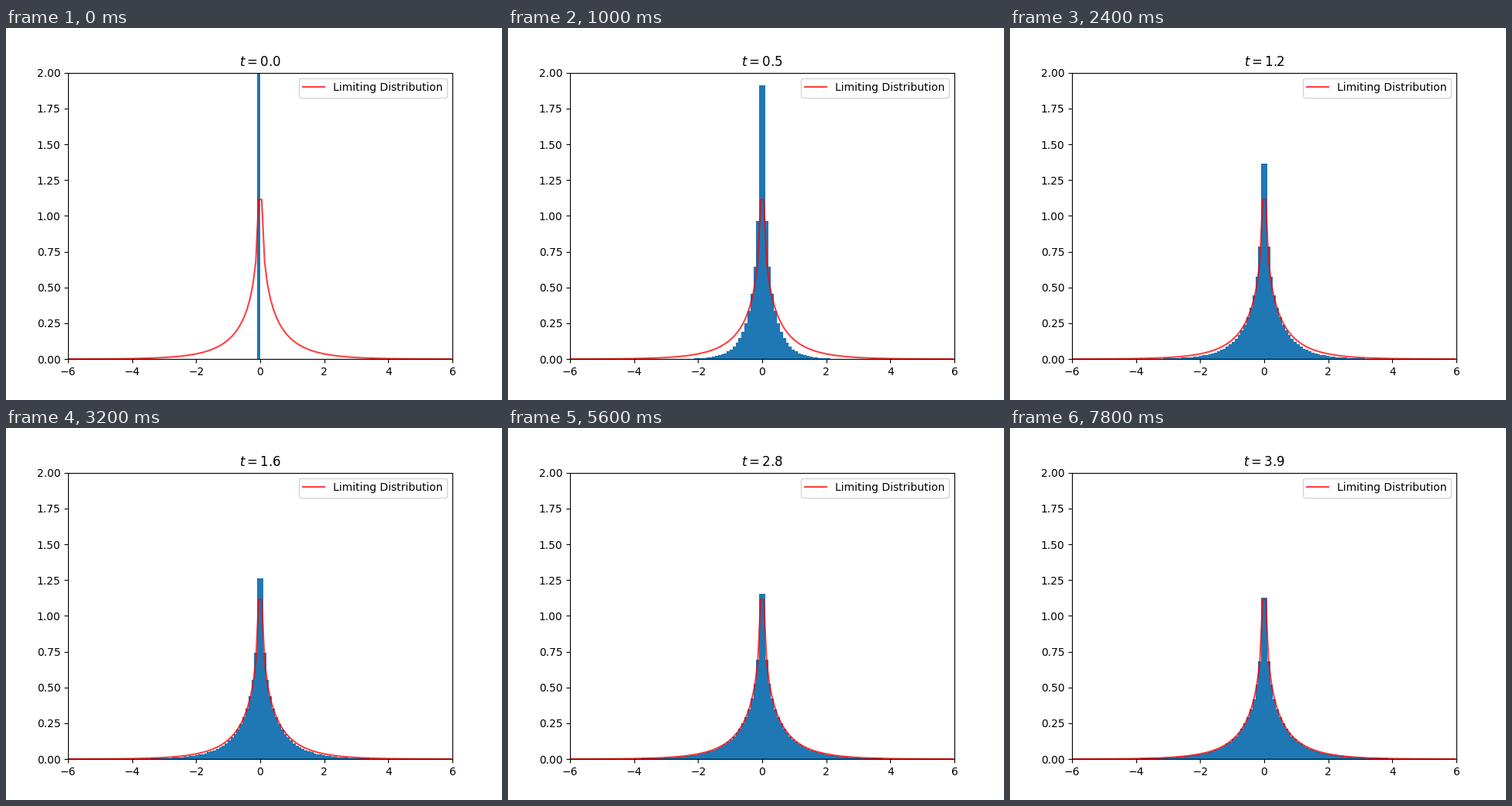
A matplotlib script for the animation above (8 s loop, 640 px wide and 480 px high).

```python
import numpy as np
import matplotlib.pyplot as plt
from matplotlib.animation import FuncAnimation

STEPS, INTERVAL, DT = 40, 200, 0.1
BINS, XMAX = 130, 6

edges = np.linspace(-XMAX, XMAX, BINS + 1)
width = 2 * XMAX / BINS
centers = edges[:-1] + width / 2

# K0(z) is the integral of exp(-z cosh u) over u > 0
u = np.linspace(0, 20, 2001)
cosh_u = np.cosh(u)
du = u[1] - u[0]


def tail(z):
    """Integral of K0 from z to infinity."""
    y = np.exp(-z * cosh_u) / cosh_u
    return du * (y.sum() - (y[0] + y[-1]) / 2)


def density(scale):
    """Mean of K0(|x| / scale) / (pi * scale) over each bin."""
    right = np.arange(BINS // 2 + 1) * width
    tails = np.array([tail(x / scale) for x in right])
    half = -np.diff(tails) / (np.pi * width)
    return np.concatenate([half[::-1], half])


def heights(t):
    if t == 0:
        start = np.zeros(BINS)
        start[BINS // 2 - 1] = 1 / width
        return start
    decay = np.exp(-t)
    return density((1 - decay) * (1 + decay / 4))


fig, ax = plt.subplots(figsize=(6.4, 4.8), dpi=100)
bars = ax.bar(edges[:-1], heights(0), width, align="edge", color="#1f77b4")
ax.plot(centers, density(1), color="red", alpha=0.75,
        label="Limiting Distribution")
ax.set_xlim(-XMAX, XMAX)
ax.set_ylim(0, 2)
ax.legend(loc="upper right")
title = ax.set_title("$t=0.0$")


def update(i):
    t = i * DT
    for bar, h in zip(bars, heights(t)):
        bar.set_height(h)
    title.set_text(f"$t={t:.1f}$")
    return [*bars, title]


anim = FuncAnimation(fig, update, frames=STEPS, interval=INTERVAL,
                     repeat=True, repeat_delay=0, blit=False)
plt.show()
```
